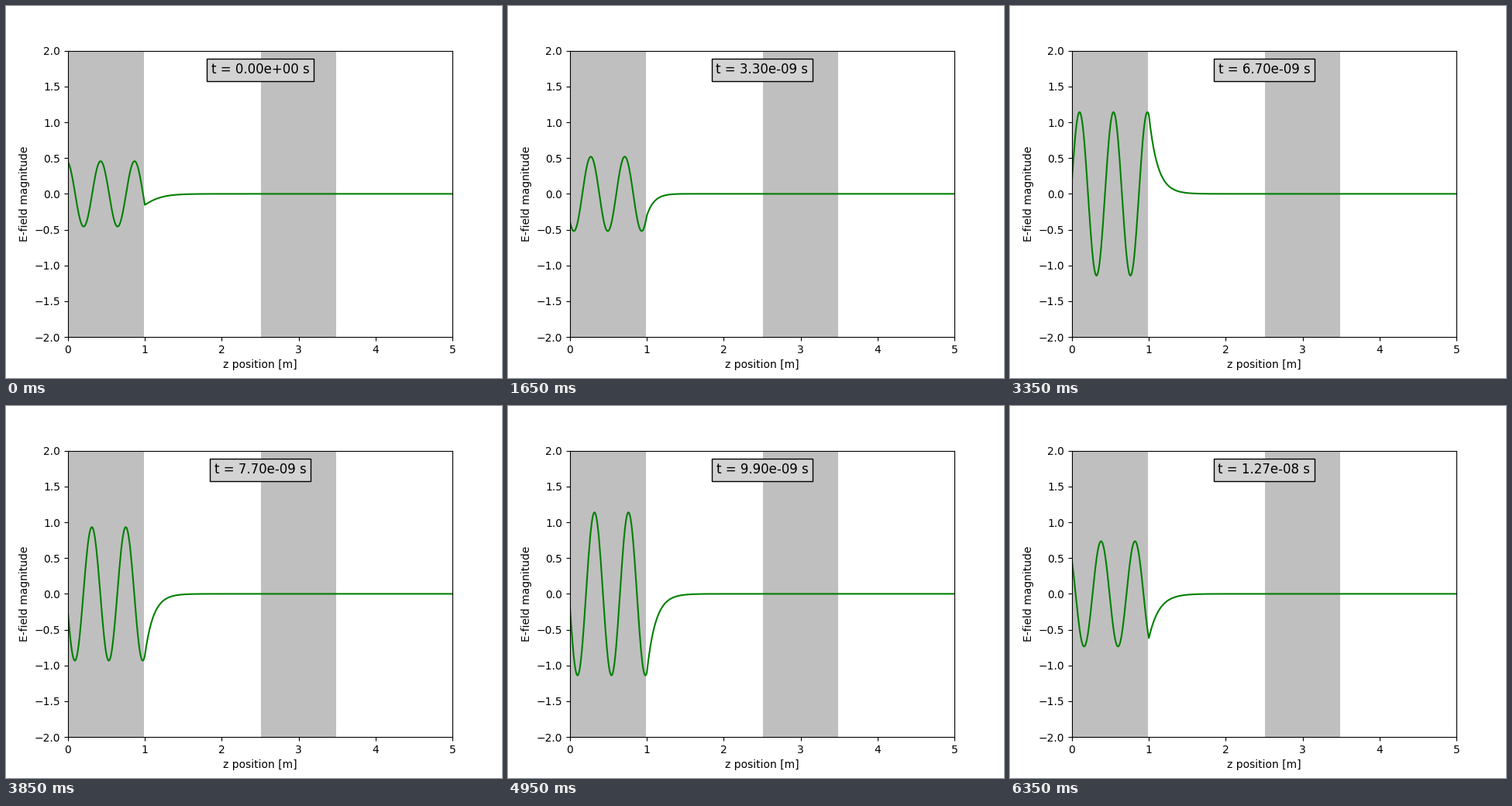
These frames come from a looping animation (640 px wide and 480 px high, 6400 ms). A matplotlib script:

```python
import numpy as np
import matplotlib.pyplot as plt
from matplotlib.animation import FuncAnimation

FRAMES, INTERVAL = 128, 50
DT = 1e-10                  # simulated seconds per frame
OMEGA = 2.9442e9            # angular frequency [rad/s]
K = 2 * np.pi * 1.45 / 0.64  # wave number in the first slab [rad/m]
GAMMA = 1.05 / 1.85         # reflection at the first interface
ALPHA, BETA = 8.5, 0.4      # decay and phase constant beyond it [1/m]
EDGE = 1.0

z = np.linspace(0, 5, 501)
s = z - EDGE


def field(t):
    phase = OMEGA * t - K * EDGE
    standing = np.cos(phase - K * s) + GAMMA * np.cos(phase + K * s)
    decay = np.exp(-ALPHA * np.maximum(s, 0))
    passed = (1 + GAMMA) * decay * np.cos(phase - BETA * s)
    return np.where(s <= 0, standing, passed)


fig, ax = plt.subplots(figsize=(6.4, 4.8), dpi=100)
ax.set_xlim(0, 5)
ax.set_ylim(-2, 2)
ax.set_xlabel("z position [m]")
ax.set_ylabel("E-field magnitude")

for left, right in ((0, 0.99), (2.51, 3.49)):
    ax.axvspan(left, right, facecolor="0.5", alpha=0.5, linewidth=0)

line, = ax.plot(z, field(0), color="green", lw=1.5)
label = ax.text(0.5, 0.92, "", transform=ax.transAxes, ha="center",
                fontsize=12, bbox=dict(facecolor="lightgray"))


def update(i):
    t = i * DT
    line.set_ydata(field(t))
    label.set_text(f"t = {t:.2e} s")
    return line, label


anim = FuncAnimation(fig, update, frames=FRAMES, interval=INTERVAL,
                     repeat=True, repeat_delay=0, blit=False)
plt.show()
```
